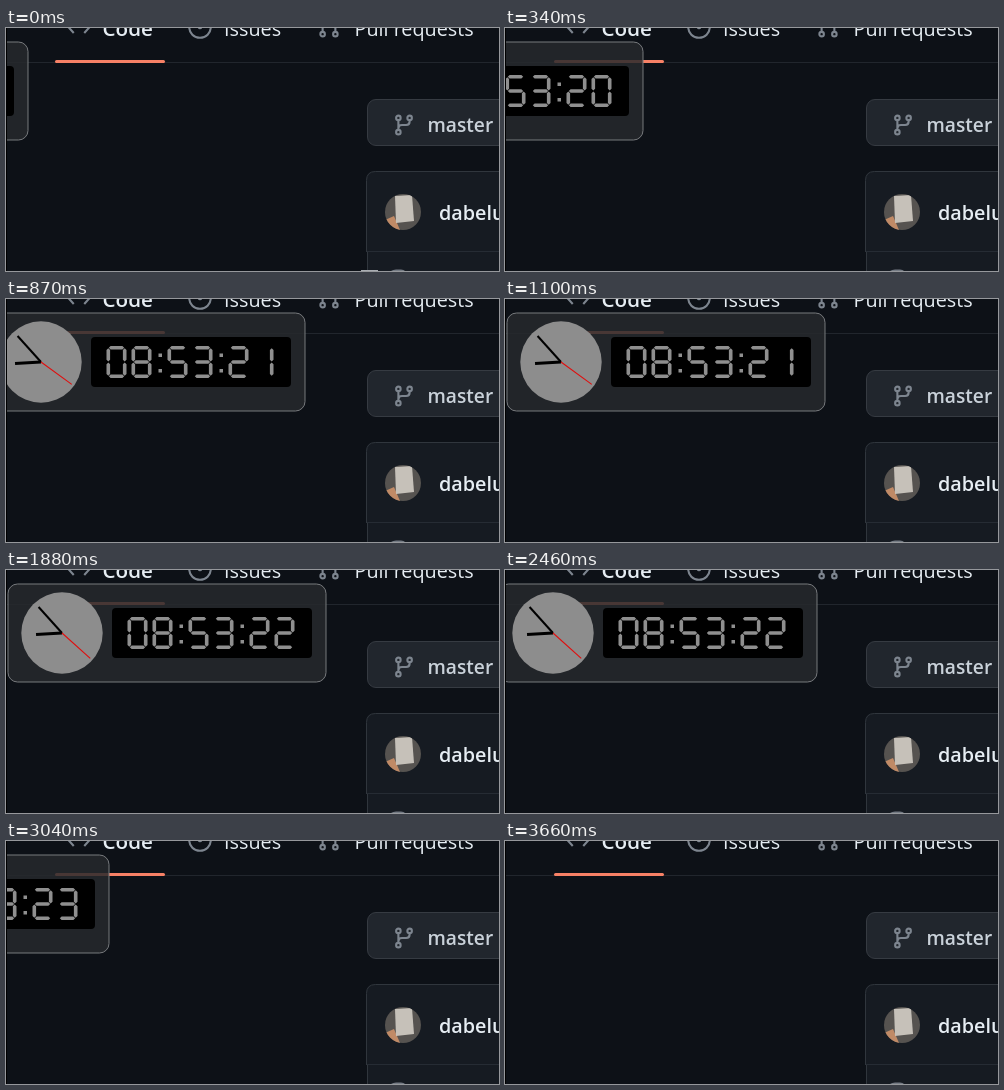
An HTML page for the animation above (3.72 s loop, 493 by 243 pixels).

```html
<!DOCTYPE html>
<html lang="en">
<head>
<meta charset="utf-8">
<title>Sliding clock</title>
<style>
  html, body { margin: 0; width: 100%; height: 100%; overflow: hidden; background: #0d1117; }
  svg { display: block; width: 493px; height: 243px; }
  text { font: 19.8px "Open Sans", "Noto Sans", sans-serif; fill: #e6edf3; }
  .strong { font-weight: 600; }
  .icon { fill: none; stroke: #7d858f; stroke-width: 1.4; }
</style>
</head>
<body>
<svg viewBox="0 0 493 243">
  <rect width="493" height="243" fill="#0d1117"/>

  <!-- Tabs -->
  <rect y="34" width="493" height="1" fill="#21262d"/>
  <rect x="49" y="32" width="110" height="3" rx="1.5" fill="#f78166"/>
  <g class="icon">
    <path transform="translate(61 -13) scale(1.5)" d="M4.5 4 .9 8l3.6 4M11.5 4l3.6 4-3.6 4"/>
    <g transform="translate(182 -13) scale(1.5)">
      <circle cx="8" cy="8" r="7.2"/>
      <circle cx="8" cy="8" r=".8"/>
    </g>
    <g transform="translate(311 -13) scale(1.5)">
      <circle cx="3.75" cy="12.75" r="1.5"/>
      <circle cx="12.25" cy="12.75" r="1.5"/>
      <path d="M3.75 5v6.2M12.25 11.2V5"/>
    </g>
  </g>
  <text class="strong" x="96.5" y="8.4" style="font-size:20.6px">Code</text>
  <text x="218" y="8.4">Issues</text>
  <text x="348.5" y="8.4">Pull requests</text>

  <!-- Branch button -->
  <rect x="361.5" y="71.5" width="150" height="46" rx="8.5" fill="#21262d" stroke="#363b42"/>
  <g class="icon" transform="translate(386 85) scale(1.5)">
    <circle cx="4.25" cy="3.25" r="1.5"/>
    <circle cx="4.25" cy="12.75" r="1.5"/>
    <circle cx="11.75" cy="3.25" r="1.5"/>
    <path d="M4.25 4.8v6.4M11.75 4.8v.9q0 2.3-2.3 2.3H6.6q-2.3 0-2.3 2.2"/>
  </g>
  <text class="strong" x="421.5" y="103.5" style="font-size:19.2px;fill:#c9d1d9">master</text>

  <!-- File list -->
  <path d="M361.5 224V243M360.500 224V152.500q0-9 9-9H500V224" fill="#161b22" stroke="#30363d"/>
  <rect x="362" y="224" width="131" height="19" fill="#161b22"/>
  <rect x="361" y="223" width="132" height="1" fill="#262c34"/>
  <clipPath id="round"><circle cx="397" cy="184" r="18"/></clipPath>
  <g clip-path="url(#round)">
    <rect x="379" y="166" width="36" height="36" fill="#565350"/>
    <path d="M379 192l9-4 6 14h-15z" fill="#c08a66"/>
    <path d="M389 168l17-1 2 26-18 2z" fill="#c6c1b9"/>
  </g>
  <text class="strong" x="433" y="191.5">dabelu</text>
  <path d="M385 243q2-1.5 5-1.5h5q3 0 4 1.5z" fill="#747b84"/>
  <rect id="hint" x="355" y="242" width="17" height="1" fill="#a9adb2"/>

  <!-- Clock panel -->
  <g id="panel">
    <rect x="2" y="14" width="318" height="98" rx="9.5" fill="#27292d" fill-opacity=".84" stroke="#777a7d"/>
    <circle cx="56" cy="63" r="40.7" fill="#8d8d8d"/>
    <path d="M56 63V37" transform="rotate(266.5 56 63)" stroke="#000" stroke-width="3"/>
    <path d="M56 63V28" transform="rotate(318 56 63)" stroke="#000" stroke-width="2"/>
    <path id="secondHand" d="M56 63V25" stroke="#e00d0d" stroke-width="1.1"/>
    <rect x="106" y="38" width="200" height="50" rx="4" fill="#000"/>
    <path id="digits" fill="#8f8f8f"/>
  </g>
  <rect width="1" height="243" fill="#000"/>
</svg>
<script>
  const LOOP = 3720, WIDTH = 320, SLIDE_OUT = 2438, HEAD_START = 60;

  // Phases of the loop: each is shown as a number of equal steps
  const PHASES = [
    { from: 0, steps: 8 }, { from: 640, steps: 6 },
    { from: 1100, steps: 1 }, { from: 1880, steps: 1 },
    { from: 2460, steps: 7 }, { from: 3040, steps: 6 },
    { from: 3500, steps: 2 }, { from: 3660, steps: 1 }
  ];

  const [panel, hand, digits, hint] =
    ['panel', 'secondHand', 'digits', 'hint'].map(id => document.getElementById(id));

  // Each segment joins two of the six nodes of a digit, numbered row by row
  const SEGMENTS = { a: '01', b: '13', c: '35', d: '45', e: '24', f: '02', g: '23' };
  const LIT = { 0: 'abcdef', 1: 'bc', 2: 'abged', 3: 'abgcd', 5: 'afgcd', 8: 'abcdefg' };

  // A bar with pointed ends, just short of its two nodes
  function bar(name, left, top) {
    const half = 1.8, gap = 0.5;
    const [[x1, y1], [x2, y2]] = [...SEGMENTS[name]].map(n =>
      [left + half + n % 2 * 16.4, top + half + (n >> 1) * 14.2]);
    const length = Math.hypot(x2 - x1, y2 - y1);
    const ux = (x2 - x1) / length, uy = (y2 - y1) / length;
    const point = (along, side) => [x1 + ux * along - uy * side, y1 + uy * along + ux * side];
    const tip = gap, shoulder = gap + half;
    return 'M' + [
      point(tip, 0), point(shoulder, half), point(length - shoulder, half),
      point(length - tip, 0), point(length - shoulder, -half), point(shoulder, -half)
    ].join(' ') + 'Z';
  }

  function timePath(text) {
    let x = 121.5, d = '';
    for (const ch of text) {
      if (ch === ':') {
        d += `M${x + 2} 54.5h3.5v3.5h-3.5zM${x + 2} 70h3.5v3.5h-3.5z`;
        x += 11;
      } else {
        for (const name of LIT[ch]) d += bar(name, x, 47);
        x += 25;
      }
    }
    return d;
  }

  function snap(t) {
    const i = PHASES.findLastIndex(p => p.from <= t);
    const { from, steps } = PHASES[i];
    const size = ((PHASES[i + 1]?.from ?? LOOP) - from) / steps;
    return from + Math.floor((t - from) / size + 1e-6) * size;
  }

  // Steady start, then a soft landing
  function travel(ms) {
    if (ms < 605) return Math.max(0, ms * 0.362);
    return WIDTH - 101 * Math.max(0, (1225 - ms) / 620) ** 2.1;
  }

  function panelShift(t) {
    if (t >= 3660) return -WIDTH - 2;
    if (t >= SLIDE_OUT) return -travel(t - SLIDE_OUT);
    return travel(t + HEAD_START) - WIDTH;
  }

  let shown = -1;
  function draw(now) {
    const t = snap(now % LOOP);
    const second = 20 + Math.floor((t + 140) / 1000);
    panel.setAttribute('transform', `translate(${Math.round(panelShift(t) + 0.45)} 0)`);
    hint.setAttribute('visibility', t < 80 ? 'visible' : 'hidden');
    if (second !== shown) {
      hand.setAttribute('transform', `rotate(${second * 6} 56 63)`);
      digits.setAttribute('d', timePath(`08:53:${second}`));
      shown = second;
    }
  }

  const start = performance.now();
  function tick() {
    draw(performance.now() - start);
    requestAnimationFrame(tick);
  }
  tick();
</script>
</body>
</html>
```
